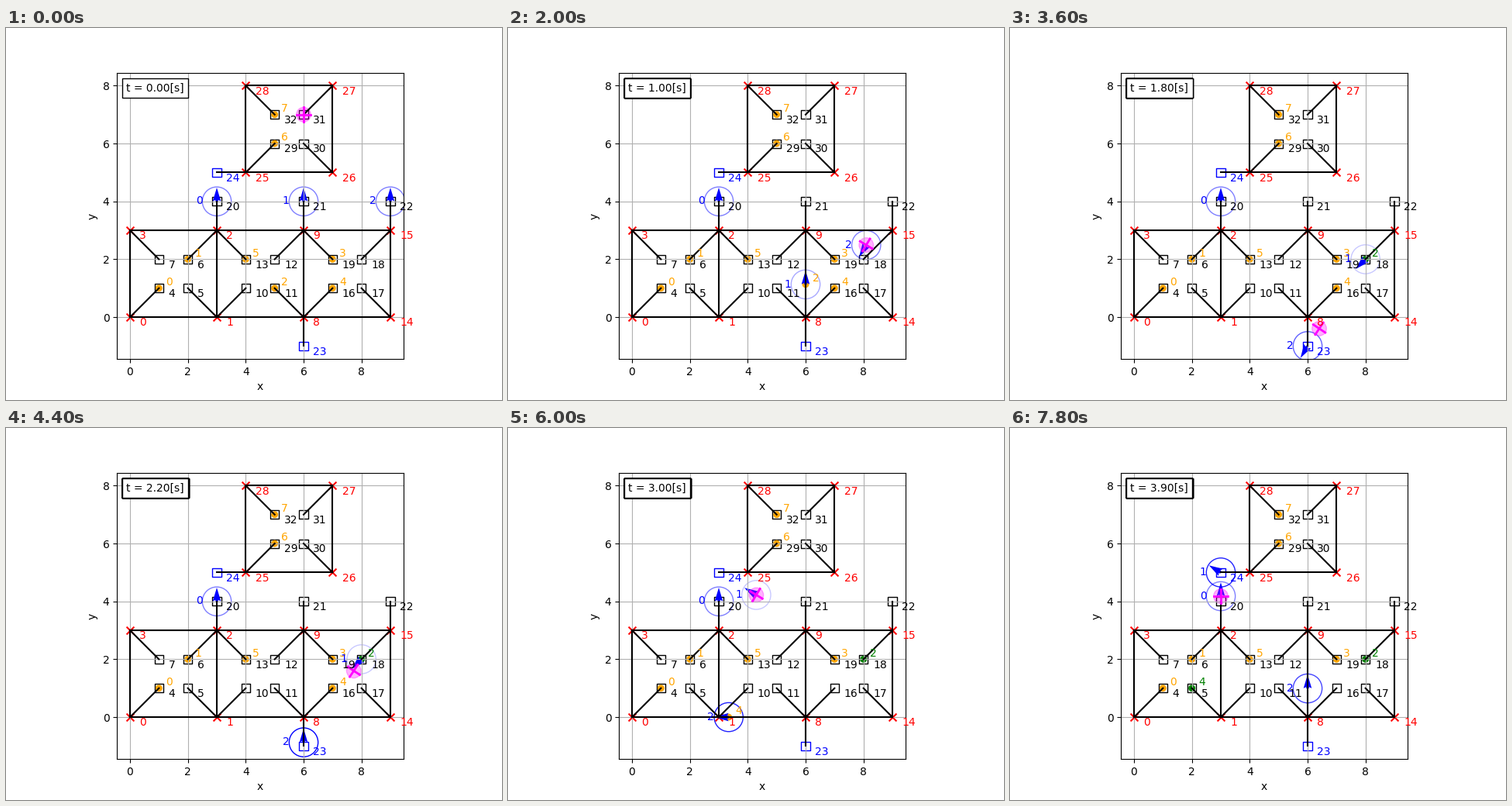
These frames come from a looping animation (640x480 px, 8 s). A matplotlib script:

```python
import numpy as np
import matplotlib.pyplot as plt
from matplotlib.animation import FuncAnimation
from matplotlib.patches import Circle

FRAMES, STEP = 40, 0.1
WALK, FLY = 8.0, 6.0          # units per second
DRAIN, CHARGE = 0.02, 1.0     # battery per unit walked, per second plugged in
START, PAUSE = 0.5, 0.005     # first battery level, handling time in seconds
AGENTS = range(3)

nodes, kinds, edges = [], [], set()


def add_node(point, kind):
    if point not in nodes:
        nodes.append(point)
        kinds.append(kind)
    return nodes.index(point)


def link(a, b):
    edges.add((min(a, b), max(a, b)))


def add_room(x, y):
    """Square room with a desk one step in from every corner."""
    ring = [(0, 0), (1, 0), (1, 1), (0, 1)]
    walls = [add_node((x + 3 * i, y + 3 * j), "corner") for i, j in ring]
    desks = [add_node((x + 1 + i, y + 1 + j), "desk") for i, j in ring]
    for k in range(4):
        link(walls[k], walls[k - 1])
        link(walls[k], desks[k])


for left in (0, 3, 6):
    add_room(left, 0)
for x in (3, 6, 9):
    link(nodes.index((x, 3)), add_node((x, 4), "desk"))
link(nodes.index((6, 0)), add_node((6, -1), "station"))
dock = add_node((3, 5), "station")
add_room(4, 5)
link(dock, nodes.index((4, 5)))
P = np.array(nodes, float)


def length(trip):
    return np.hypot(*np.diff(P[trip], axis=0).T).sum()


def chain(start, speed, *trips):
    """Legs (start, end, speed, trip) with a short pause between trips."""
    legs = []
    for trip in trips:
        end = start + length(trip) / speed
        legs.append((start, end, speed, trip))
        start = end + PAUSE
    return legs


def pose(legs, t):
    """Position and unit heading at time t."""
    pos, head = P[legs[0][3][0]], np.array([0.0, 1.0])
    for start, _, speed, trip in legs:
        left = (t - start) * speed
        for a, b in zip(trip, trip[1:]):
            if left <= 1e-9:
                break
            gap = P[b] - P[a]
            dist = np.hypot(*gap)
            head = gap / dist
            pos = P[a] + head * min(left, dist)
            left -= dist
    return pos, head


# The drone fetches tired agents and flies them to a station
sortie = [31, 22, 23, 18, 24, 20]
pick2, drop2, pick1, drop1 = (length(sortie[:n]) / FLY for n in range(2, 6))
leave2 = drop2 + (1 - START) / CHARGE + PAUSE

walk1 = chain(0, WALK, [21, 9, 8, 11], [11, 8, 9, 15, 18])
walk2 = chain(leave2, WALK, [23, 8, 16], [16, 8, 1, 5], [5, 1, 8, 9])
lift0 = chain(3.87, FLY, [20, 24])

drone = chain(0, FLY, sortie) + lift0
routes = [lift0,
          walk1 + chain(pick1, FLY, [18, 24]),
          chain(pick2, FLY, [22, 23]) + walk2]
walks = [[], walk1, walk2]
plugged = [np.inf, drop1, drop2]

desks = [4, 6, 11, 19, 16, 13, 29, 32]
carried = {2: (1, walk1[1]), 4: (2, walk2[1])}   # task: agent, leg


def battery(i, t):
    gone = sum(speed * (np.clip(t, start, end) - start)
               for start, end, speed, _ in walks[i])
    gain = CHARGE * max(0, t - plugged[i])
    if i == 2:
        return min(1, START + gain) - DRAIN * gone
    return min(1, START + gain - DRAIN * gone)


fig, ax = plt.subplots(figsize=(6.4, 4.8), dpi=100)
ax.set_aspect("equal")
ax.set_xlabel("x")
ax.set_ylabel("y")
ax.grid(True)

for a, b in sorted(edges):
    ax.plot(*P[[a, b]].T, color="black", lw=1.5)
ax.set(xlim=ax.get_xlim(), ylim=ax.get_ylim())

COLORS = dict(corner="red", desk="black", station="blue")
for n, ((x, y), kind) in enumerate(zip(P, kinds)):
    color = COLORS[kind]
    if kind == "corner":
        ax.scatter(x, y, s=50, marker="x", color=color)
    else:
        ax.scatter(x, y, s=64, marker="s", fc="none", ec=color)
    ax.text(x + 0.33, y - 0.3, str(n), color=color)

dots = [ax.add_patch(Circle((0, 0), 0.1)) for _ in desks]
dot_tags = [ax.text(0, 0, str(k)) for k in range(len(desks))]

rings = [ax.add_patch(Circle((0, 0), 0.5, fill=False, ec="blue"))
         for _ in AGENTS]
tags = [ax.text(0, 0, str(i), color="blue") for i in AGENTS]
arrows = ax.quiver(*np.zeros((2, 3)), *np.ones((2, 3)), color="blue",
                   angles="xy", scale_units="xy", scale=2.1, width=0.0095,
                   zorder=1)

disc = ax.add_patch(Circle((0, 0), 0.25, color="magenta", alpha=0.3))
blades = [ax.plot([], [], color="magenta", lw=2)[0] for _ in range(2)]

# Clock boxes pile up, so their soft edges darken over time
clocks = [ax.text(-0.13, 7.8, f"t = {k * STEP:.2f}[s]",
                  bbox=dict(facecolor="white", edgecolor="black"))
          for k in range(FRAMES)]


def draw(k):
    t = k * STEP
    spots, heads = map(np.array, zip(*(pose(legs, t) for legs in routes)))
    arrows.set_offsets(spots)
    arrows.set_UVC(*heads.T)
    for i, (x, y) in enumerate(spots):
        rings[i].center = x, y
        rings[i].set_alpha(battery(i, t))
        tags[i].set_position((x - 0.73, y - 0.1))

    for n, home in enumerate(desks):
        (x, y), color = P[home], "orange"
        if n in carried:
            agent, (start, end, _, trip) = carried[n]
            if t >= end:
                (x, y), color = P[trip[-1]], "green"
            elif t >= start:
                x, y = spots[agent]
        dots[n].center = x, y
        dots[n].set_color(color)
        dot_tags[n].set_position((x + 0.23, y + 0.1))
        dot_tags[n].set_color(color)

    (x, y), (u, v) = pose(drone, t)
    disc.center = x, y
    for blade, (a, b) in zip(blades, ((u, v), (-v, u))):
        a, b = 0.25 * a, 0.25 * b
        blade.set_data([x - a, x + a], [y - b, y + b])

    for i, clock in enumerate(clocks):
        clock.set_visible(i <= k)


anim = FuncAnimation(fig, draw, frames=FRAMES, interval=200,
                     init_func=lambda: draw(0), repeat=True, repeat_delay=0)
plt.show()
```
